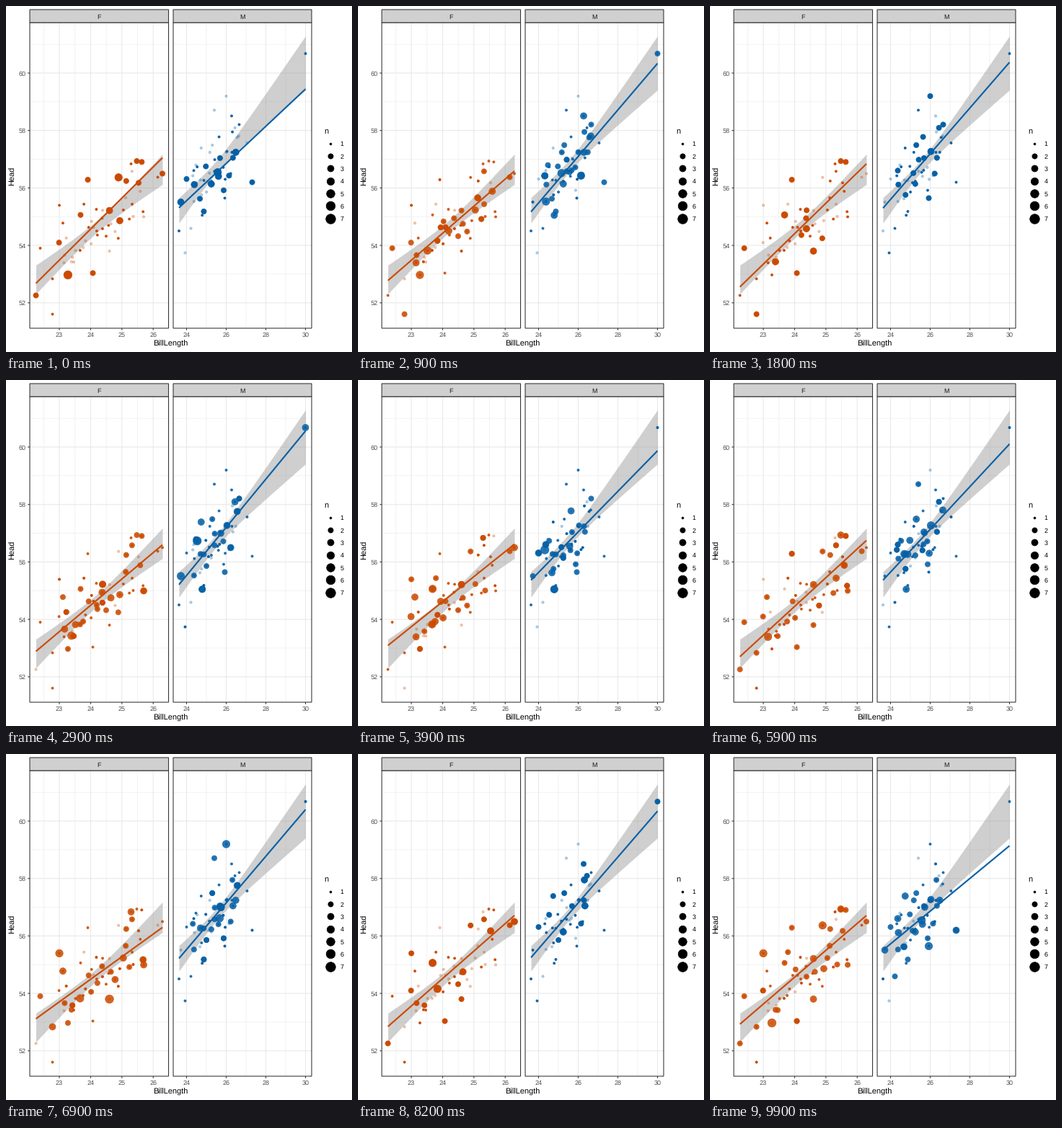
Recreate the animation shown at these times as a matplotlib script. Size 480 px wide and 480 px high, loop 10000 ms.

```python
import numpy as np
import matplotlib.pyplot as plt
from matplotlib.animation import FuncAnimation
from matplotlib.colors import to_rgba
from matplotlib.patches import Rectangle

SIZE, DPI = 480, 72
DRAWS, STEPS = 20, 5           # bootstrap draws, and frames per draw
FADE = 0.85
DARK, GRID, STRIP = "#333333", "#e8e8e8", "#d0d0d0"
TOP, BOTTOM = 23.5, 447.5
plt.rcParams["font.family"] = "Liberation Sans"
plt.rcParams["text.hinting"] = "none"
plt.rcParams["text.hinting_factor"] = 1

rng = np.random.default_rng(11)


class Group:
    """One sex: its panel, trend line, birds and bootstrap draws."""

    def __init__(self, name, color, panel, x_of, major, minor,
                 ends, trend, ribbon, outer, cloud):
        self.name, self.color, self.panel = name, color, panel
        self.x_of, self.major, self.minor = x_of, major, minor
        self.ends, self.trend = np.array(ends), np.array(trend)
        self.ribbon = ribbon
        self.birds = np.vstack([outer, self.scatter(*cloud)])
        total = len(self.birds)
        self.counts = rng.multinomial(total, np.full(total, 1 / total), DRAWS)
        mean = self.fit(np.ones(total))
        self.lines = [self.trend + self.fit(n) - mean for n in self.counts]

    def on_trend(self, x):
        (x0, x1), (y0, y1) = self.ends, self.trend
        return y0 + (y1 - y0) * (x - x0) / (x1 - x0)

    def scatter(self, total, left, right, spread):
        """Birds spread evenly along the trend, normally around it."""
        x = np.linspace(left, right, total) + rng.normal(0, 2, total)
        off = np.clip(rng.normal(0, spread, total), -1.9 * spread, 1.9 * spread)
        return np.column_stack([x, self.on_trend(x) + off - off.mean()])

    def fit(self, n):
        slope, base = np.polyfit(*self.birds.T, 1, w=np.sqrt(n))
        return base + slope * self.ends


# the outermost birds are placed, the crowd between them is random
groups = [
    Group("F", "#cb4a00", (33.5, 226), lambda v: 74.5 + 43.4 * (v - 23),
          range(23, 27), np.arange(22.5, 27),
          (42, 217.5), (380, 227), (127, 8.5, 0.213),
          [(42, 402), (48, 336.5), (65, 428), (65, 379), (74.5, 277),
           (114, 241.5), (121, 371), (144, 340.5), (174, 219.5),
           (191.5, 293), (211, 238), (217.5, 233)],
          (45, 74, 192, 25)),
    Group("M", "#0560a6", (232.5, 424.5), lambda v: 251 + 27.5 * (v - 24),
          range(24, 31, 2), (25, 27, 29),
          (240.5, 416), (284, 79.5), (293, 8.5, 0.297),
          [(240.5, 312.5), (243, 272.5), (249, 343), (251, 240.5),
           (257, 309), (289.5, 145), (304, 267), (306, 125.5),
           (313.5, 153), (324, 165), (335, 190.5), (342, 245),
           (416, 66.5)],
          (43, 259, 322, 25)),
]


def area(n):
    """Marker area for a count, on a square-root size scale from 1 to 6."""
    size = 1 + 5 * np.sqrt((np.maximum(n, 1) - 1) / 6)
    return (0.75 * (size * 2.845 + 0.945)) ** 2


fig = plt.figure(figsize=(SIZE / DPI, SIZE / DPI), dpi=DPI, facecolor="white")
ax = fig.add_axes([0, 0, 1, 1])
ax.set(xlim=(0.5, SIZE + 0.5), ylim=(SIZE + 0.5, 0.5))
ax.axis("off")


def label(x, y, s, size=8.8, color="#4d4d4d", ha="center",
          va="center_baseline", **kw):
    ax.text(x, y, s, size=size, color=color, ha=ha, va=va, **kw)


def seg(x, y, color=GRID, lw=1.07):
    ax.plot(x, y, color=color, lw=lw, zorder=1, solid_capstyle="butt",
            snap=False)


def box(left, top, right, bottom, fill):
    ax.add_patch(Rectangle((left, top), right - left, bottom - top, fc=fill,
                           ec=DARK, lw=1.07, zorder=8, snap=False))


def y_of(v):
    return 412.3 - 39.85 * (v - 52)


def draw_panel(g):
    left, right = g.panel
    for v in g.minor:
        seg([g.x_of(v)] * 2, [TOP, BOTTOM], lw=0.53)
    for v in range(52, 62):
        seg([left, right], [y_of(v)] * 2, lw=0.53 if v % 2 else 1.07)
    for v in g.major:
        seg([g.x_of(v)] * 2, [TOP, BOTTOM])
        seg([g.x_of(v)] * 2, [BOTTOM, BOTTOM + 2.75], DARK)
        label(g.x_of(v), 456.5, str(v))
    mid, waist, flare = g.ribbon
    x = np.linspace(*g.ends, 80)
    half = np.hypot(waist, flare * (x - mid))
    ax.fill_between(x, g.on_trend(x) - half, g.on_trend(x) + half,
                    color="#898989", alpha=0.4, lw=0, zorder=2)
    box(left, TOP, right, BOTTOM, "none")
    box(left, 5.5, right, TOP, STRIP)
    label((left + right) / 2, 15, g.name, color="#1a1a1a", zorder=9)


for g in groups:
    draw_panel(g)
for v in range(52, 61, 2):
    seg([30.75, 33.5], [y_of(v)] * 2, DARK)
    label(28.5, y_of(v) + 0.3, str(v), ha="right")
label(229, 472, "BillLength", 11, "black", va="baseline")
label(10, 236, "Head", 11, "black", rotation=90, va="center")
label(441.3, 177.5, "n", 11, "black", "left", va="baseline")
for n in range(1, 8):
    y = 174 + 17.3 * n
    ax.scatter(450, y, s=area(n), c="black", lw=0.71, snap=False)
    label(464, y + 0.3, str(n), color="black", ha="left")

spots = np.vstack([g.birds for g in groups])
tints = np.vstack([np.tile(to_rgba(g.color), (len(g.birds), 1))
                   for g in groups])


def paint(dots, alpha):
    c = tints.copy()
    c[:, 3] = alpha
    dots.set_facecolors(c)
    dots.set_edgecolors(c)


def dots(z):
    return ax.scatter(*spots.T, s=3.4 ** 2, lw=0.71, zorder=z, snap=False)


paint(dots(3), 0.3)
layers = [dots(4), dots(5)]
fits = [ax.plot(g.ends, g.trend, color=g.color, lw=2.13, zorder=6,
                solid_capstyle="butt")[0] for g in groups]


def show(layer, k, alpha):
    n = np.concatenate([g.counts[k] for g in groups])
    layer.set_sizes(area(n))
    paint(layer, np.where(n > 0, alpha, 0))


def update(i):
    k, step = divmod(i, STEPS)
    nxt = (k + 1) % DRAWS
    fading = step == STEPS - 1
    show(layers[0], k, FADE if fading else 1)
    show(layers[1], nxt, FADE if fading else 0)
    for line, g in zip(fits, groups):
        y = g.lines[k]
        line.set_ydata((y + g.lines[nxt]) / 2 if fading else y)
    return layers + fits


anim = FuncAnimation(fig, update, frames=DRAWS * STEPS, interval=100,
                     init_func=lambda: update(0), repeat=True, repeat_delay=0)
plt.show()
```
